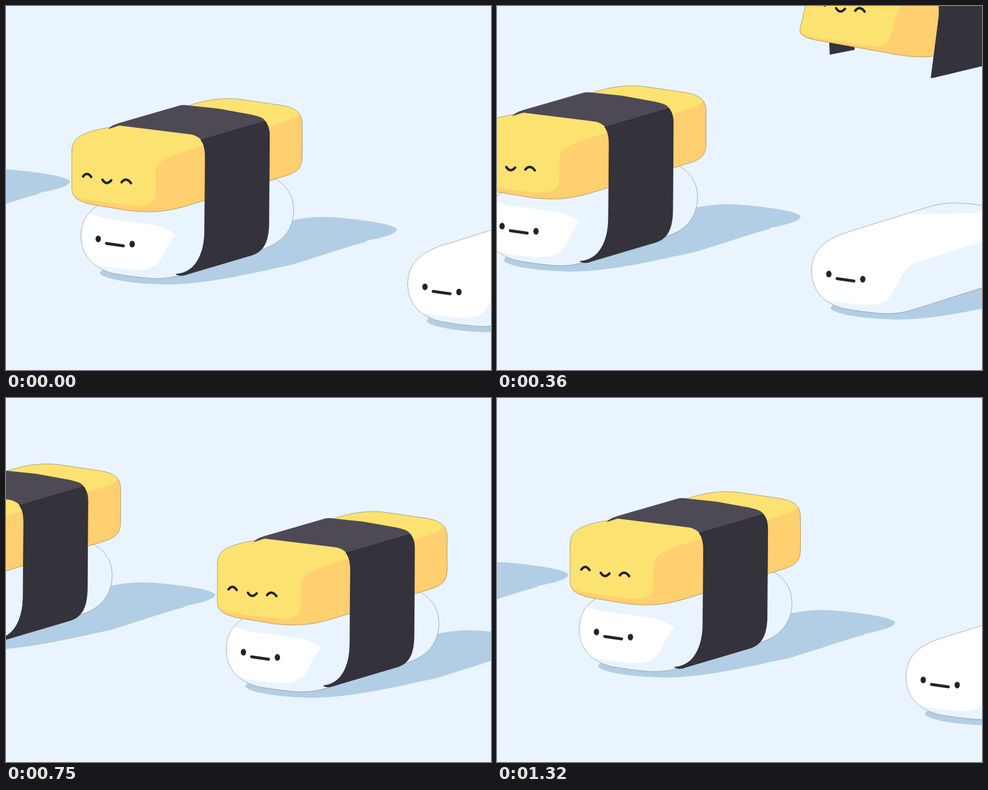
Animation, 800 px wide and 600 px high, one loop 1.35 s. Source, as an HTML page with a canvas:

```html
<!DOCTYPE html>
<html lang="en">
<head>
<meta charset="utf-8">
<title>Sushi line</title>
<style>
html, body { margin: 0; width: 100%; height: 100%; overflow: hidden; background: #e9f4ff; }
canvas { display: block; }
</style>
</head>
<body>
<canvas id="stage" width="800" height="600"></canvas>
<script>
const ctx = document.getElementById('stage').getContext('2d');
const LOOP = 1350, STEP_X = 539, STEP_Y = 79;
const INK = '#242428', SHADE = '#e9f4ff', HAIRLINE = 'rgba(60,60,70,.55)';

const shadow = new Path2D('M155,440 C158,450 215,459 270,459 C340,458 420,437 470,427 C520,412 565,396 593,389 L595,387 C620,382 645,376 645,368 C640,360 600,354 560,350 C525,346 500,348 475,353 L300,400 L160,434 Z');
const rice = new Path2D('M124,378 C125,345 145,327 183,315 L318,273 C345,265 365,266 392,269 C440,275 474,295 475,335 C475,370 455,392 420,402 L300,440 C275,448 260,450 240,449 C215,447 195,444 178,441 C145,433 124,412 124,378 Z');
const riceSide = new Path2D('M110,418 C150,429 195,435 222,435 C246,434 254,423 262,406 C268,395 271,389 277,381 C284,371 290,367 300,364 L357,346 L600,270 L600,500 L100,500 Z');
const riceTop = new Path2D('M0,100 L600,100 L600,378 L290,386 C275,370 260,364 245,361 L165,350 C148,347 140,341 120,340 L0,340 Z');
const riceMouth = new Path2D('M166,391.5 L194,395.5');
const eggFace = new Path2D('M127.5,281 Q134.5,272 141,282 M159.5,286.5 Q166,296.5 174,287.5 M191,290.5 Q198.5,281.5 206.5,292');

// Each soft part has three poses: falling, rebound, rest.
const egg = [
  'M123,200 C127,188 137,185 152,186 L191,190 L291,165 C320,146 345,135 365,137 L441,143 C468,147 475,150 474,165 C478,190 490,215 495,240 C496,255 490,262 465,270 L330,319 C310,322 290,321 265,317 L131,293 C108,288 102,282 106,270 C111,250 117,222 123,200 Z',
  'M116,228 C115,214 122,209 140,203 L188,190 L292,158 C325,147 360,143 390,148 L446,156 C472,160 482,166 482,182 C479,200 479,215 482,240 C483,260 478,268 460,275 L300,326 C270,336 245,339 215,335 L142,323 C122,319 115,314 116,297 C119,275 119,250 116,228 Z',
  'M109,240 C109,220 120,212 150,204 L187,197 L302,164 C335,153 365,150 395,155 L450,163 C478,167 489,175 489,195 C489,212 489,228 489,245 C489,265 484,272 465,279 L300,329 C260,341 235,341 200,337 L140,327 C115,320 109,315 109,298 C109,280 109,258 109,240 Z'
];
const eggSide = [
  'M100,270 C105,283 118,287 131,289 L215,302 C242,305 249,303 254,285 L268,240 C274,222 282,219 334,209 L430,180 C455,172 468,165 472,155 L510,150 L510,300 L200,380 L90,330 Z',
  'M110,300 C118,314 128,316 142,318 L205,327 C240,331 250,325 250,308 L252,275 C246,245 262,234 300,226 L430,190 C460,181 475,176 480,168 L510,160 L510,300 L200,380 L90,330 Z',
  'M105,300 C112,316 125,318 140,320 L200,328 C235,331 247,325 247,305 L247,275 C247,258 262,250 300,238 L435,199 C465,190 480,185 486,176 L510,170 L510,300 L200,380 L90,330 Z'
];
const noriTop = [
  'M189,190 C191,189 192,189 195,188 L280,166 C288,164 291,164 300,166 L350,171 L400,180 C416,183 421,185 426,194 L330,215 C322,208 314,206 304,205 L191,190 Z',
  'M171,197 C176,192 180,190 190,187 L280,160 C288,157 291,157 301,158 L350,163 L405,172 C420,175 424,178 429,186 L321,214 C313,207 308,206 298,204 L187,191 Z',
  'M169,203 C174,197 180,195 190,192 L280,166 C290,163 292,163 302,164 L350,169 L405,179 C422,183 426,185 430,193 L324,222 C316,214 310,212 300,211 L187,197 Z'
];
const noriSide = [
  'M328,213 L424,190 C430,196 432,202 434,212 L442,300 C443,310 444,318 445,326 L324,355 C322,355 321,355 321,355 C322,350 322,345 323,340 L334,255 C335,236 334,222 328,213 Z',
  'M319,213 L427,183 C431,189 432,194 432,205 L432,355 C432,360 432,365 432,370 L331,400 C329,401 328,401 328,401 C328,390 328,380 328,370 L329,245 C329,228 326,220 319,213 Z',
  'M322,221 L428,190 C433,197 435,203 435,215 L434,360 C433,390 425,405 405,411 L300,442 C292,445 286,445 281,442 C312,440 328,410 328,370 L329,250 C329,236 327,228 322,221 Z'
];
const noriFlap = [
  'M153,295 L154,317 L195,309 L195,290 Z',
  'M170,290 L170,300 L195,300 L195,290 Z',
  'M170,290 L170,300 L195,300 L195,290 Z'
];
const faceShift = ['5,-46', '5,-8', '0,0'];

const NUMBER = /-?\d+/g;
const clamp = x => Math.min(1, Math.max(0, x));
const ease = x => (x = clamp(x), x * x * (3 - 2 * x));

// Blends neighbouring poses; pose runs from 0 to 2.
function blend(poses, pose) {
  const i = Math.min(1, Math.floor(pose)), k = pose - i;
  const to = poses[i + 1].match(NUMBER);
  let j = 0;
  return poses[i].replace(NUMBER, n => +n + (to[j++] - n) * k);
}

// Piecewise smooth value through [time, value] pairs.
function track(keys, t) {
  if (t <= keys[0][0]) return keys[0][1];
  for (let i = 1; i < keys.length; i++) {
    const [t0, a] = keys[i - 1], [t1, b] = keys[i];
    if (t < t1) return a + (b - a) * ease((t - t0) / (t1 - t0));
  }
  return keys[keys.length - 1][1];
}

function fill(path, color) {
  ctx.fillStyle = color;
  ctx.fill(path);
}

function line(path, color, width) {
  ctx.strokeStyle = color;
  ctx.lineWidth = width;
  ctx.stroke(path);
}

function shifted(x, y, draw) {
  ctx.save();
  ctx.translate(x, y);
  draw();
  ctx.restore();
}

function dot(x, y) {
  ctx.fillStyle = INK;
  ctx.beginPath();
  ctx.ellipse(x, y, 4.4, 5.5, 0, 0, 7);
  ctx.fill();
}

function drawRice(age, drop) {
  const stretch = track([[410, 1], [455, 1.018], [600, .992], [720, 1]], age);
  const shadeY = track([[450, -12], [600, -4], [720, 0]], age) + drop * .3;
  ctx.save();
  ctx.translate(300, 0);
  ctx.scale(stretch, 1);
  ctx.translate(-300, 0);
  fill(rice, '#fff');
  ctx.save();
  ctx.clip(rice);
  fill(riceSide, SHADE);
  if (age > 270) shifted(0, shadeY, () => fill(riceTop, SHADE));
  ctx.restore();
  line(rice, HAIRLINE, .7);
  dot(152.5, 384);
  dot(208.5, 392.5);
  line(riceMouth, INK, 4.8);
  ctx.restore();
}

function drawTopping(age) {
  const pose = track([[450, 0], [600, 1], [780, 2]], age);
  const shape = poses => new Path2D(blend(poses, pose));
  const body = shape(egg), top = shape(noriTop), side = shape(noriSide);
  fill(shape(noriFlap), '#34323b');
  fill(body, '#fce270');
  ctx.save();
  ctx.clip(body);
  fill(shape(eggSide), '#ffcf70');
  ctx.restore();
  line(body, HAIRLINE, .7);
  shifted(...blend(faceShift, pose).split(',').map(Number), () => line(eggFace, INK, 4));
  fill(top, '#4d4a55');
  fill(side, '#34323b');
  line(side, '#29272f', .8);
}

function drawSushi(age) {
  const drop = -460 * (1 - Math.pow(clamp((age - 270) / 180), 1.5));
  const k = 1 - age / LOOP;
  shifted(STEP_X * k, STEP_Y * k, () => {
    fill(shadow, '#b2cee5');
    drawRice(age, drop);
    if (age > 270) shifted(0, drop, () => drawTopping(age));
  });
}

function frame(now) {
  const t = now % LOOP;
  ctx.fillStyle = SHADE;
  ctx.fillRect(0, 0, 800, 600);
  ctx.lineCap = ctx.lineJoin = 'round';
  for (let n = 2; n >= -1; n--) drawSushi(t + n * LOOP);
  requestAnimationFrame(frame);
}
requestAnimationFrame(frame);
</script>
</body>
</html>
```
